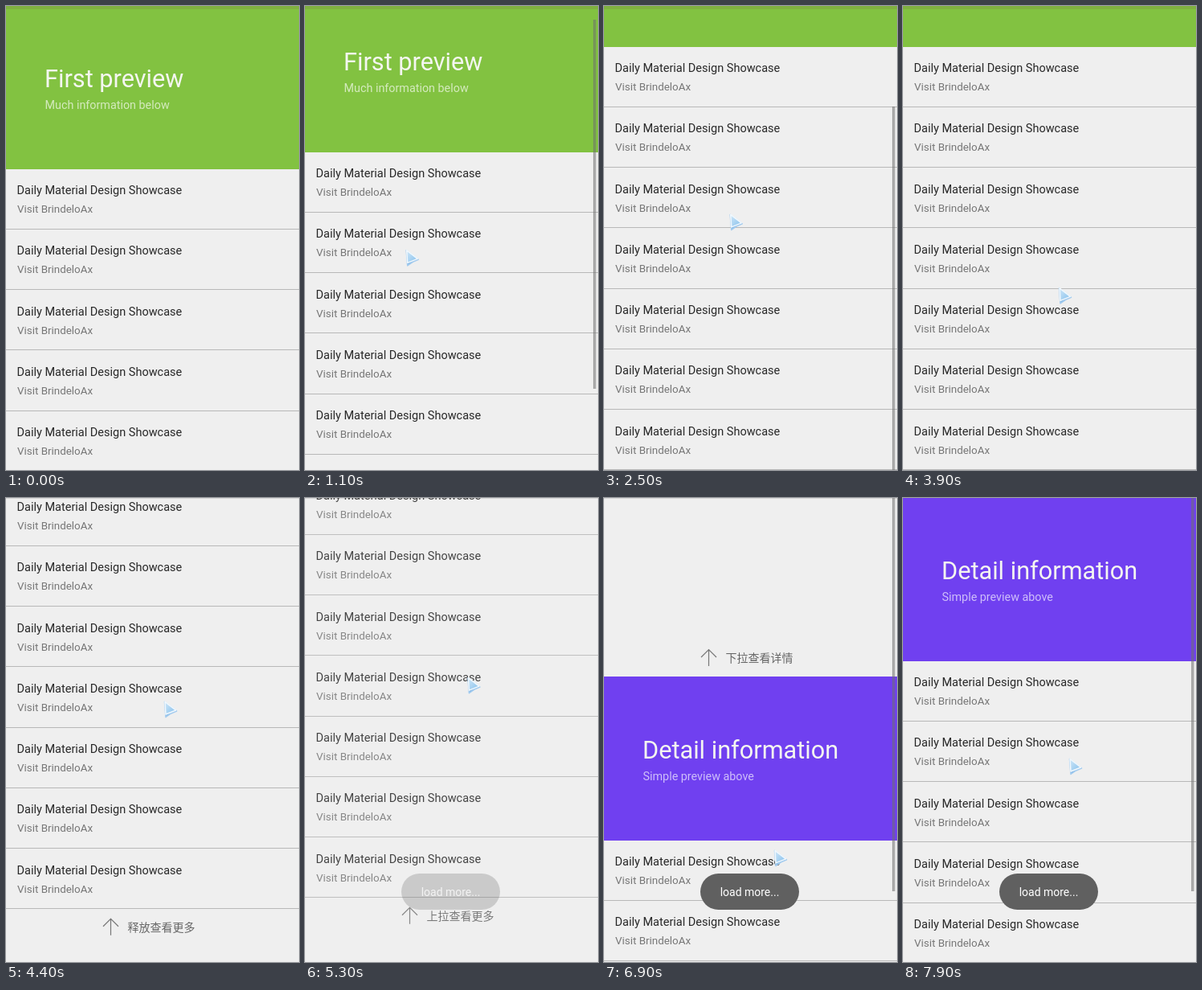
Recreate the animation shown at these times as an HTML page. Size 365 px wide and 577 px high, loop 8 s.

```html
<!DOCTYPE html>
<html lang="en">
<head>
<meta charset="utf-8">
<title>Two-page pull</title>
<style>
html, body { margin: 0; width: 100%; height: 100%; overflow: hidden; background: #efefef; }
svg { display: block; width: 365px; height: 577px; }
text { font-family: Roboto, Arial, sans-serif; white-space: pre; }
.head { font-size: 30.7px; fill: #f4f6f1; }
.tag { font-size: 14.35px; fill: #fff; fill-opacity: .66; }
.title { font-size: 14.5px; fill: #282828; }
.sub { font-size: 13.4px; fill: #777; }
.hint { font-family: "Noto Sans CJK SC", "Noto Sans CJK", sans-serif; font-size: 14px; fill: #666; }
.arrow { fill: none; stroke: #777; stroke-width: 1.2; }
.rule { fill: #b8b8b8; }
.toast { font-size: 14px; fill: #fff; text-anchor: middle; }
</style>
</head>
<body>
<svg viewBox="0 0 365 577">
  <defs>
    <linearGradient id="ice" x1="0" y1="0" x2="1" y2="1">
      <stop offset="0" stop-color="#cfe7f8"/>
      <stop offset="1" stop-color="#86c0ec"/>
    </linearGradient>
  </defs>
  <rect width="365" height="577" fill="#efefef"/>
  <rect width="365" height="1" fill="#d6d6d6"/>
  <g id="preview"></g>
  <rect id="strip" width="365" height="4" fill="#80b040"/>
  <g id="detail"></g>
  <rect id="bar" x="359" width="3.5" fill="#707070" fill-opacity=".55"/>
  <g id="toast">
    <rect x="120" y="467" width="123" height="45" rx="22.5" fill="#606060"/>
    <text class="toast" x="181.5" y="495">load more...</text>
  </g>
  <g id="cursor" stroke-linejoin="round">
    <path d="M1.5 1.5L16.5 13L9.5 16L3 20.5Z" fill="#86b9e6" stroke="#a3cbee" stroke-width="1.5"/>
    <path d="M2 1.5L15.5 12L3 17Z" fill="url(#ice)" stroke="#f1f8fd" stroke-width="1.5"/>
  </g>
</svg>
<script>
const LOOP = 8000, HEAD = 203, ROW = 75.25, ROWS = 7;
const END = HEAD + ROW * ROWS;
const $ = id => document.getElementById(id);

function add(parent, tag, attrs, text) {
  const el = document.createElementNS('http://www.w3.org/2000/svg', tag);
  for (const key in attrs) el.setAttribute(key, attrs[key]);
  if (text) el.textContent = text;
  parent.append(el);
  return el;
}
const label = (parent, cls, x, y, text) => add(parent, 'text', { class: cls, x, y }, text);

function addHint(parent, y, text) {
  add(parent, 'path', { class: 'arrow', d: `M130.5 ${y + 21}V${y}M121 ${y + 10}L130.5 ${y + .5}L140 ${y + 10}` });
  return label(parent, 'hint', 151.5, y + 16, text);
}

function addPage(parent, color, top, head, tag) {
  add(parent, 'rect', { y: top, width: 365, height: HEAD - top, fill: color });
  label(parent, 'head', 48, 101, head);
  label(parent, 'tag', 48.5, 128, tag);
  for (let i = 0; i < ROWS; i++) {
    const y = HEAD + i * ROW;
    label(parent, 'title', 13.5, y + 31.2, 'Daily Material Design Showcase');
    label(parent, 'sub', 14, y + 54, 'Visit BrindeloAx');
    add(parent, 'rect', { class: 'rule', y: Math.floor(y + ROW - 1), width: 365, height: 1 });
  }
}

addPage($('preview'), '#82c241', 0, 'First preview', 'Much information below');
const moreHint = addHint($('preview'), END + 11, '上拉查看更多');
addPage($('detail'), '#7040f0', -1, 'Detail information', 'Simple preview above');
addHint($('detail'), -35, '下拉查看详情');

const linear = p => p;
const easeOut = p => 1 - (1 - p) ** 2;
const easeInOut = p => (1 - Math.cos(Math.PI * p)) / 2;
const set = (id, attrs) => { for (const key in attrs) $(id).setAttribute(key, attrs[key]); };

function draw(t) {
  // Progress from 0 to 1 between two times.
  const ramp = (from, to, ease = linear) => ease(Math.max(0, Math.min(1, (t - from) / (to - from))));

  // Drag and fling, then a damped pull past the end.
  const scroll = Math.round(73 * ramp(900, 1600) + 79 * ramp(1600, 2000, easeOut)
    + 66 * ramp(3900, 4400, easeOut) + 14 * ramp(4400, 5300));
  set('preview', { transform: `translate(0 ${-scroll})`, opacity: 1 - ramp(5200, 5900) });
  set('strip', { height: Math.max(0, Math.min(4, HEAD - scroll)) });
  moreHint.textContent = t > 4250 && t < 5200 ? '释放查看更多' : '上拉查看更多';

  const rise = Math.round(577 * (1 - ramp(5600, 7870, easeInOut)));
  set('detail', { transform: `translate(0 ${rise})`, opacity: t < 5600 ? 0 : 1 });

  const second = t >= 5600;
  set('bar', {
    y: second ? 0 : Math.round(scroll * .825),
    height: second ? 489 : 459,
    opacity: second || (t >= 950 && t < 3500) ? 1 : 0
  });

  set('toast', { opacity: ramp(5200, 5600) });

  const x = 84 + 61 * ramp(100, 1600) + 48 * ramp(2300, 3200) + 18 * ramp(3900, 6900) - 5 * ramp(6900, 7900);
  const y = 270 + 106 * ramp(100, 500) - 163 * ramp(500, 1830) + 201 * ramp(2300, 3200)
    - 162 * ramp(3570, 4400) - 30 * ramp(4400, 5300) + 215 * ramp(5300, 6900) - 114 * ramp(6900, 7900);
  set('cursor', { transform: `translate(${x} ${y})`, opacity: t < 100 ? 0 : 1 });
}

const start = performance.now();
function tick() {
  draw((performance.now() - start) % LOOP);
  requestAnimationFrame(tick);
}
draw(0);
requestAnimationFrame(tick);
</script>
</body>
</html>
```
